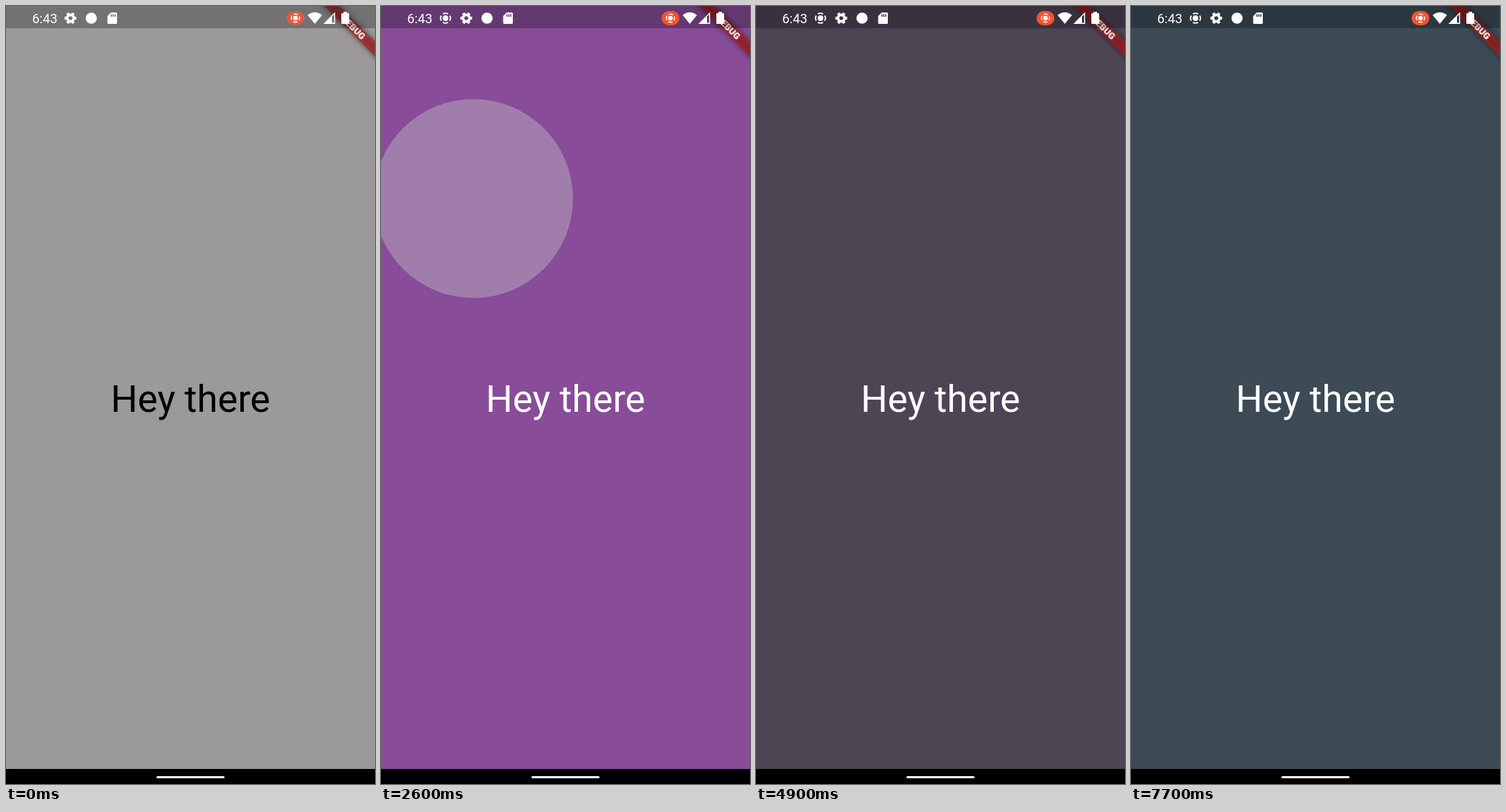
An HTML page for the animation above (8000 ms loop, 515x1087 px).

```html
<!DOCTYPE html>
<html lang="en">
<head>
<meta charset="utf-8">
<title>Hey there</title>
<style>
  html, body { margin: 0; width: 100%; height: 100%; overflow: hidden; background: #000; }
  svg { display: block; width: 515px; height: 1087px; font-family: Roboto, sans-serif; }

  .page, .press, .splash, .hello, .pill { animation: 8s step-end infinite; }
  .page { animation-name: page; }
  .press { animation-name: press; fill: #bcbcbc; }
  .splash { animation-name: splash; fill: #c8c8c8; }
  .hello { animation-name: hello; }
  .pill { animation-name: pill; }
  .shift { animation: shift 8s infinite; }
  .appear { animation: appear 8s infinite; }

  /* a tap swaps the page colour at once */
  @keyframes page {
    0% { fill: #9b999b; }
    22.5% { fill: #9a1c73; }
    32.5% { fill: #7b2f8f; }
    47.5% { fill: #0a6c6b; }
    61.25% { fill: #4d4454; }
    72.5% { fill: #901c3c; }
    87.5% { fill: #a51a0d; }
    96.25%, 100% { fill: #3c4b55; }
  }
  /* touch highlight over the whole page */
  @keyframes press {
    0%, 25%, 33.75%, 48.75%, 100% { opacity: 0; }
    21.25%, 31.25%, 32.5%, 46.25%, 47.5%, 22.5% { opacity: .2; }
    23.75% { opacity: .08; }
  }
  @keyframes splash {
    0%, 33.75%, 96.25%, 100% { opacity: 0; transform: translate(129px, 269px); }
    31.25% { opacity: .4; transform: translate(129px, 269px) scale(.45); }
    32.5% { opacity: .4; transform: translate(129px, 269px); }
    87.5% { opacity: .24; transform: translate(203px, 236px); }
  }
  @keyframes hello {
    0% { fill: #000; }
    22.5%, 100% { fill: #fff; }
  }
  @keyframes pill {
    0% { fill: #dc5c40; rx: 12.5px; }
    1.25%, 100% { fill: #f4512e; rx: 10px; }
  }
  /* a new status icon pushes the others right */
  @keyframes shift {
    0%, 10% { transform: none; animation-timing-function: steps(4, jump-both); }
    15%, 100% { transform: translateX(29px); }
  }
  @keyframes appear {
    0%, 10% { opacity: 0; animation-timing-function: steps(4, jump-both); }
    15%, 100% { opacity: 1; }
  }
</style>
</head>
<body>
<svg viewBox="0 0 515 1087">
  <defs>
    <filter id="blur" x="-30%" y="-200%" width="160%" height="500%">
      <feGaussianBlur stdDeviation="4.5"/>
    </filter>
    <g id="record">
      <circle r="3.9" fill="#fff"/>
      <circle r="6.9" fill="none" stroke="#fff" stroke-width="1.9"
        pathLength="80" stroke-dasharray="14 6" stroke-dashoffset="7"/>
    </g>
  </defs>

  <rect class="page" width="515" height="1066"/>
  <rect class="press" width="515" height="1066"/>
  <circle class="splash" r="139"/>
  <text class="hello" x="257.5" y="567" font-size="52.6" text-anchor="middle">Hey there</text>

  <g transform="translate(515 0) rotate(45)">
    <rect x="-80" y="35" width="160" height="15" opacity=".5" filter="url(#blur)"/>
    <rect x="-80" y="35" width="160" height="15" fill="#b71c1c" fill-opacity=".627"/>
    <text y="47.1" font-size="12.8" font-weight="900" fill="#fff" text-anchor="middle">DEBUG</text>
  </g>

  <rect width="515" height="31" fill-opacity=".26"/>
  <g fill="#fff">
    <text x="36.6" y="24" font-size="18.3">6:43</text>
    <g class="appear"><use href="#record" x="90" y="17"/></g>
    <g class="shift">
      <g transform="translate(90 17)">
        <circle r="4.6" fill="none" stroke="#fff" stroke-width="3.6"/>
        <circle r="6.6" fill="none" stroke="#fff" stroke-width="3.4"
          pathLength="60" stroke-dasharray="5.4 4.6" stroke-dashoffset="2.7"/>
      </g>
      <circle cx="119" cy="17" r="7.8"/>
      <path fill-rule="evenodd" d="M146.5 9H153.500q1.500 0 1.500 1.500V23.500q0 1.500-1.500 1.500H143q-1.500 0-1.500-1.500V14z
        M146 11.500v3.500h1.500v-3.500z M148.700 11.500v3.500h1.500v-3.500z M151.400 11.500v3.500h1.500v-3.500z"/>
    </g>
    <rect class="pill" x="391.500" y="7" width="25" height="20" ry="10"/>
    <use href="#record" transform="translate(404 17) scale(.82)"/>
    <path d="M431 25L421 12.800Q431 4.800 441 12.800z"/>
    <path fill-rule="evenodd" d="M443 25L459.300 8.500V25z M455 14.800V23.500H457.800V12z"/>
    <path d="M471 8h5v2h1.800q1.200 0 1.200 1.200v12.600q0 1.200-1.200 1.200h-8.600q-1.200 0-1.200-1.200V11.200q0-1.200 1.200-1.200H471z"/>
  </g>

  <rect y="1066" width="515" height="21"/>
  <rect x="210" y="1076" width="95" height="3" rx="1.500" fill="#fff"/>
</svg>
</body>
</html>
```
